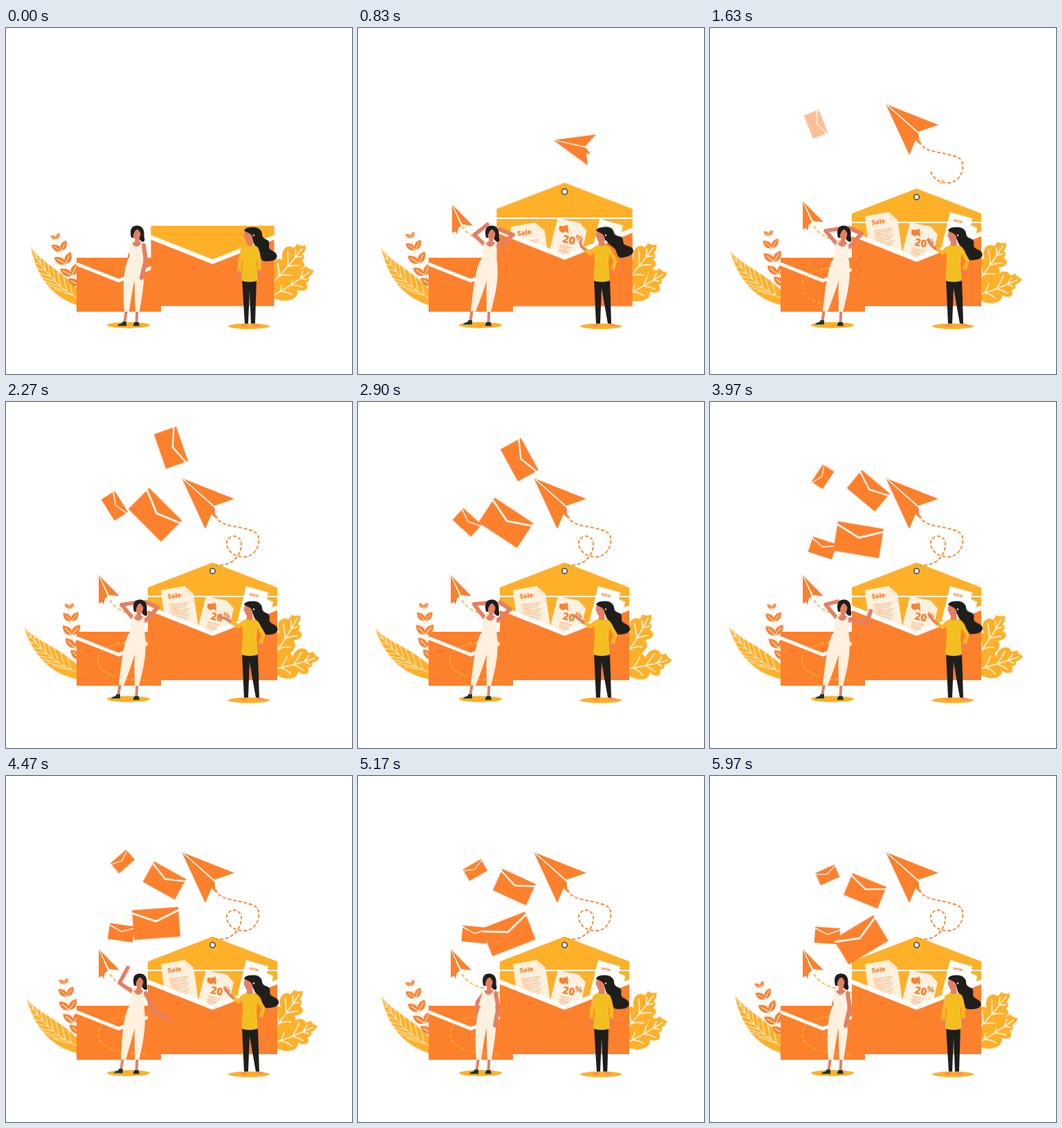
Recreate the animation shown at these times as an HTML page. Size 500 by 500 pixels, loop 6 s.

```html
<!DOCTYPE html>
<html lang="en">
<head>
<meta charset="utf-8">
<title>Mail campaign</title>
<style>
html, body { margin: 0; width: 100%; height: 100%; overflow: hidden; background: #fff; }
svg { display: block; width: 100vw; height: 100vh; }
text { font-family: "Open Sans", "Noto Sans", sans-serif; font-weight: 800; fill: #fd802d; }
.o { fill: #fd802d; }
.y { fill: #ffb029; }
.c { fill: #fff1e0; }
.k { fill: #1e1e1c; }
.s { fill: #e57f62; }
.teal { fill: #12363c; }
.w { fill: none; stroke: #fff; }
.limb { fill: none; stroke-linecap: round; stroke-linejoin: round; }
.skin { stroke: #e57f62; }
.sleeve { stroke: #fdb827; }
.anim { animation: 6s linear infinite; }
.pose { animation: 6s ease-in-out infinite; }

.sway { animation: sway 6s cubic-bezier(.37,0,.63,1) infinite; }
@keyframes sway { 0%, 100% { transform: rotate(0deg); } 50% { transform: rotate(var(--a)); } }

/* big envelope */
#big { transform-origin: 298.5px 402px; animation-name: pulse; }
@keyframes pulse {
  0%, 2% { transform: scale(.952); }
  12%, 14% { transform: scale(1.05); }
  19%, 53% { transform: scale(1); }
  57%, 59% { transform: scale(1.05); }
  64%, 100% { transform: scale(1); }
}
#flap { transform-origin: 298px 281px; animation-name: open; }
@keyframes open { 0%, 2% { transform: scaleY(-1); } 9%, 100% { transform: scaleY(1); } }
#edge { animation-name: edge; }
@keyframes edge { 0%, 2% { opacity: 0; } 4%, 100% { opacity: 1; } }
.letter { animation-name: rise; }
@keyframes rise {
  0%, 5% { transform: translateY(58px); }
  13.8% { transform: translateY(var(--mid)); }
  20%, 53% { transform: translateY(0); }
  57%, 59% { transform: translateY(var(--hop)); }
  64%, 100% { transform: translateY(0); }
}

/* paper planes */
#plane { animation-name: plane; }
@keyframes plane {
  0%, 6% { transform: translate(312px,262px) rotate(-70deg) scale(.1); opacity: 0; }
  7% { transform: translate(309px,235px) rotate(-62deg) scale(.3); opacity: 1; }
  10.5% { transform: translate(298px,178px) rotate(-45deg) scale(.62); }
  13.83% { transform: translate(282px,162px) rotate(-29deg) scale(.765); }
  21.2% { transform: translate(260px,122px) rotate(-7deg) scale(.95); }
  26%, 100% { transform: translate(254px,110px) rotate(0deg) scale(1); opacity: 1; }
}
#dart { animation-name: dart; }
@keyframes dart {
  0%, 5% { transform: translate(190px,340px) rotate(-20deg) scale(.2); opacity: 0; }
  6% { transform: translate(180px,325px) rotate(-20deg) scale(.4); opacity: 1; }
  13.83% { transform: translate(136px,255px) rotate(0deg) scale(1); }
  20%, 100% { transform: translate(134px,250px) rotate(0deg) scale(1); opacity: 1; }
}
.reveal { stroke-dasharray: 100; animation-name: reveal1; }
.reveal.b { animation-name: reveal2; }
@keyframes reveal1 { 0%, 18.3% { stroke-dashoffset: 100; } 32.5%, 100% { stroke-dashoffset: 0; } }
@keyframes reveal2 { 0%, 11.7% { stroke-dashoffset: 100; } 30%, 100% { stroke-dashoffset: 0; } }

/* falling mail */
#m1 { animation-name: m1; }
@keyframes m1 {
  0%, 25.4% { transform: translate(152px,137px) rotate(70deg) scale(.54); opacity: 0; }
  27.17% { transform: translate(153px,139px) rotate(68deg) scale(.54); opacity: .5; }
  29% { opacity: 1; }
  37.83% { transform: translate(157px,150px) rotate(58deg) scale(.54); }
  57.83% { transform: translate(158.5px,195.5px) rotate(28deg) scale(.54); }
  74.5% { transform: translate(166.5px,226.5px) rotate(8deg) scale(.54); animation-timing-function: ease-out; }
  100% { transform: translate(169.5px,230.5px) rotate(4deg) scale(.54); opacity: 1; }
}
#m2 { animation-name: m2; }
@keyframes m2 {
  0%, 32.5% { transform: translate(216px,155px) rotate(51deg); opacity: 0; }
  36% { opacity: 1; }
  37.83% { transform: translate(215.5px,163px) rotate(45deg); }
  57.83% { transform: translate(212px,185px) rotate(23deg); }
  74.5% { transform: translate(217px,213px) rotate(-4deg); animation-timing-function: ease-out; }
  100% { transform: translate(218px,237px) rotate(-31deg); opacity: 1; }
}
#m3 { animation-name: m3; }
@keyframes m3 {
  0%, 33% { transform: translate(239px,65px) rotate(74deg) scale(.79); opacity: 0; }
  36.5% { opacity: 1; }
  37.83% { transform: translate(238.5px,66px) rotate(71deg) scale(.79); }
  43% { transform: translate(236px,71px) rotate(67deg) scale(.79); }
  57.83% { transform: translate(228.5px,105.5px) rotate(51deg) scale(.79); }
  74.5% { transform: translate(229px,151px) rotate(29deg) scale(.79); animation-timing-function: ease-out; }
  100% { transform: translate(224px,166px) rotate(22deg) scale(.79); opacity: 1; }
}
#m4 { animation-name: m4; }
@keyframes m4 {
  0%, 51% { transform: translate(154px,80px) rotate(-84deg) scale(.45); opacity: 0; }
  54.5% { opacity: 1; }
  57.83% { transform: translate(157.3px,92.3px) rotate(-72deg) scale(.45); }
  74.5% { transform: translate(168.5px,123.5px) rotate(-41deg) scale(.45); animation-timing-function: ease-out; }
  100% { transform: translate(169.7px,143px) rotate(-24deg) scale(.45); opacity: 1; }
}

/* woman in white */
#aL { animation-name: aL; }
@keyframes aL {
  0%, 2%, 90%, 100% { d: path("M182 314L178 334L180 352"); }
  7% { d: path("M182 314L165 322L160 306"); }
  13.8% { d: path("M183 313L168 299L187 284"); }
  19%, 40% { d: path("M183 312L167 293L187 290"); }
  57.8%, 63% { d: path("M183 312L168 291L187 291"); }
  73%, 77% { d: path("M183 312L164 299L176 277"); }
  83% { d: path("M182 314L168 322L165 340"); }
}
#aR { animation-name: aR; }
@keyframes aR {
  0%, 2%, 88%, 100% { d: path("M199 314L202 335L196 361"); }
  7% { d: path("M201 314L219 320L224 303"); }
  13.8% { d: path("M204 315L224 299L205 291"); }
  19%, 46% { d: path("M204 314L219 297L202 289"); }
  56%, 64% { d: path("M203 314L228 318L232 295"); }
  73%, 77% { d: path("M202 314L214 339L234 351"); }
}
#suit { animation-name: suit; }
@keyframes suit {
  0%, 2%, 85%, 100% { d: path("M178 331C170 345 168 375 171 410L178 410C181 390 183 375 186 365C186 380 186 395 187 410L193 410C197 385 202 360 198 331Z"); }
  11%, 66% { d: path("M180 331C170 343 167 375 163 409L170 410C177 392 182 378 186 365C185 380 186 395 186 410L192 410C199 385 205 357 200 331Z"); }
}
.lean { animation-name: lean; }
@keyframes lean { 0%, 2%, 88%, 100% { transform: translate(0,0); } 12%, 75% { transform: translate(var(--x),0); } }
#foot { animation-name: foot; }
@keyframes foot { 0%, 2%, 85%, 100% { transform: translate(0,0); } 11%, 66% { transform: translate(-9px,-2px); } }

/* woman in yellow */
#lock { transform-origin: 356px 298px; animation-name: lock; }
@keyframes lock {
  0%, 2%, 100% { transform: rotate(0deg); }
  13.8% { transform: rotate(-13deg); }
  27.2% { transform: rotate(-4deg); }
  37.8% { transform: rotate(-2deg); }
  57.8% { transform: rotate(-4deg); }
  74.5% { transform: rotate(-5deg); }
  90% { transform: rotate(0deg); }
}
#sL { animation-name: sL; }
@keyframes sL {
  0%, 2%, 88%, 100% { d: path("M342 319L338 338L337 352"); }
  13.8%, 76% { d: path("M342 319L336 326L328 320"); }
  37.8% { d: path("M342 319L336 324L324 317"); }
}
#hL { animation-name: hL; }
@keyframes hL {
  0%, 2%, 88%, 100% { d: path("M337 353L338 357L337 361"); }
  13.8% { d: path("M328 320L323 316L321 309"); }
  27.2% { d: path("M326 319L320 314L315 306"); }
  37.8% { d: path("M324 317L317 313L308 310"); }
  57.8%, 76% { d: path("M328 320L322 315L317 308"); }
}
#sR { animation-name: sR; }
@keyframes sR {
  0%, 2%, 88%, 100% { d: path("M362 319L366 335L366 350"); }
  12%, 76% { d: path("M362 319L372 336L368 349"); }
}
#hR { animation-name: hR; }
@keyframes hR {
  0%, 2%, 88%, 100% { d: path("M366 351L366 358"); }
  12%, 76% { d: path("M368 350L363 355"); }
}
#legs { animation-name: legs; }
@keyframes legs {
  0%, 2%, 88%, 100% { d: path("M341 362L345 427L350 427L352 378L354 427L360 427L362 362Z"); }
  12%, 76% { d: path("M341 362L344 427L350 427L352 376L361 427L366 427L364 362Z"); }
}
#step { animation-name: step; }
@keyframes step { 0%, 2%, 88%, 100% { transform: translate(0,0); } 12%, 76% { transform: translate(6px,-1px); } }
</style>
</head>
<body>
<svg viewBox="0 0 500 500">
  <defs>
    <g id="mail">
      <rect class="o" x="-33.5" y="-21.5" width="67" height="43"/>
      <path class="w" stroke-width="2.6" d="M-33.5 -17L0 -3L33.5 -17"/>
    </g>
    <path id="trail1" pathLength="100" d="M303 164C309 181 334 178 352 185C366 188 367 198 364 208C358 224 345 226 333 222C322 218 316 206 320 199C325 192 337 191 340 203C341 222 327 237 304 236"/>
    <path id="trail2" pathLength="100" d="M150 286C158 298 168 304 184 307C212 312 226 326 206 347C165 344 134 352 133 372C133 394 165 403 208 402"/>
    <mask id="mask1" maskUnits="userSpaceOnUse" x="0" y="0" width="500" height="500">
      <use href="#trail1" class="reveal anim" fill="none" stroke="#fff" stroke-width="6"/>
    </mask>
    <mask id="mask2" maskUnits="userSpaceOnUse" x="0" y="0" width="500" height="500">
      <use href="#trail2" class="reveal b anim" fill="none" stroke="#fff" stroke-width="6"/>
    </mask>
    <path id="blade" d="M36 316C49 338 84 352 107 382L108 402C70 392 44 362 36 316Z"/>
    <clipPath id="bladeClip"><use href="#blade"/></clipPath>
    <g id="oak">
      <path class="y" d="M0 4C-9 0 -22 -12 -18 -24Q-15 -30 -10 -30Q-20 -37 -18 -46Q-15 -53 -10 -52Q-8 -57 -10 -60Q-4 -60 1 -66Q6 -61 5 -54Q12 -54 10 -47Q19 -47 18 -41Q17 -35 12 -32Q19 -29 19 -22C19 -10 10 0 0 4Z"/>
      <path class="w" stroke-width="1.4" d="M0 2Q2 -30 0 -60M-13 -23Q-4 -16 .5 -10Q5 -18 14 -22M-13 -44Q-5 -36 1 -28Q6 -35 13 -40M-6 -53L.5 -44L7 -51"/>
    </g>
  </defs>

  <!-- plants -->
  <g class="sway" style="--a:-8.3deg;transform-origin:102px 400px">
    <use href="#blade" class="y"/>
    <path id="veins" class="w" stroke-width=".9" clip-path="url(#bladeClip)"/>
  </g>
  <g id="sprig" class="sway" style="--a:17deg;transform-origin:108px 375px"></g>
  <g class="sway" style="--a:21deg;transform-origin:387px 386px">
    <use href="#oak" transform="translate(387 386) rotate(57) scale(1.03)"/>
  </g>
  <g class="sway" style="--a:-10deg;transform-origin:387px 366px">
    <use href="#oak" transform="translate(387 366) rotate(41) scale(1.05)"/>
  </g>

  <!-- small envelope -->
  <rect class="o" x="102" y="332" width="122" height="78"/>
  <path class="w" stroke-width="5" d="M102 341L163 365L224 341"/>
  <g mask="url(#mask2)"><use href="#trail2" fill="none" stroke="#ffb029" stroke-width="1.6" stroke-dasharray="1.9 1.2"/></g>

  <!-- big envelope -->
  <g id="big" class="pose">
    <g id="flap" class="pose">
      <path class="y" d="M205 281V268L298.5 232L392 268V281Z"/>
      <circle cx="298.5" cy="244.3" r="3.8" fill="#fff" stroke="#4b4640" stroke-width="1.6"/>
    </g>
    <path class="y" d="M205 280H392V298L298.5 336L205 298Z"/>
    <path id="edge" class="w anim" stroke-width="2" d="M205 281H392"/>
    <g class="letter anim" style="--mid:21px;--hop:-4px">
      <path class="c" d="M224 272L258 266L271 277L279 332L232 337Z"/>
      <path d="M258 266L260 278L271 277Z" fill="#ffe9d0"/>
      <text transform="translate(234 284.5) rotate(-8)" font-size="9.2">Sale</text>
      <path id="lines1" stroke="#fd802d" stroke-width=".8" opacity=".75"/>
    </g>
    <g class="letter anim" style="--mid:16px;--hop:-3px">
      <path fill="#fff" d="M347 266L379 275L377 285L386 289L380 325L335 315Z"/>
      <text transform="translate(351.5 279.5) rotate(12)" font-size="5">NOW</text>
    </g>
    <g class="letter anim" style="--mid:0px;--hop:-6px">
      <path class="c" d="M289 281L319 287L329 298L319 342L275 335Z"/>
      <path class="o" d="M291 294Q291 290 296 292L303 290L304 302L300 299L296 301L291 298Z"/>
      <text transform="translate(295 314) rotate(12)" font-size="15">20</text>
      <text transform="translate(313 311) rotate(12)" font-size="11">%</text>
      <path id="lines2" stroke="#fd802d" stroke-width=".8" opacity=".75"/>
    </g>
    <path fill="#fff" d="M205 294L298.5 331L392 294V303L298.5 340L205 303Z"/>
    <path class="o" d="M205 301L298.5 338L392 301V402H205Z"/>
  </g>

  <!-- woman in white -->
  <ellipse class="y" cx="177" cy="429.3" rx="31" ry="4.4"/>
  <g>
    <path id="aL" class="limb skin pose" stroke-width="5.5" d="M182 314L178 334L180 352"/>
    <g id="foot" class="pose">
      <path class="limb skin" stroke-width="4" d="M174 408L171.5 425"/>
      <path class="teal" d="M169 424L174 424.5V430.5H161Q162 427.5 167 427Z"/>
    </g>
    <path class="limb skin" stroke-width="4" d="M189.5 408L188.5 425"/>
    <path class="teal" d="M186 425H191.5L193 430.5H183.5Q184 427 186 425Z"/>
    <path id="suit" class="c pose" d="M178 331C170 345 168 375 171 410L178 410C181 390 183 375 186 365C186 380 186 395 187 410L193 410C197 385 202 360 198 331Z"/>
    <g class="lean pose" style="--x:2.5px">
      <path class="s" d="M180 318Q178 311 186 309L187 303H192L193 309Q203 311 201 319Z"/>
      <path class="c" d="M180 310L182 310Q184 316 189 316Q194 315 196 309L198 310Q197 316 198 322L197.500 333H178Q180 326 176 324Q179 317 180 310Z"/>
    </g>
    <path id="aR" class="limb skin pose" stroke-width="6" d="M199 314L202 335L196 361"/>
    <g class="lean pose" style="--x:4px">
      <path class="k" d="M181 303C178 291 182 285 190 285.5C198 286 200 293 199.5 299C199 303 202 306 199 309C196 309 193 307 192 303Z"/>
      <path class="s" d="M183.5 296Q185 291 189 290Q194 292 194.5 297Q194 303 191 306Q188 307 185 304Q183 301 183.5 296Z"/>
      <path class="k" d="M181 299Q182 290 191 287L195 291Q193 294 193 297Q193 292 190 291Q185 292 183.5 302Z"/>
    </g>
  </g>

  <!-- woman in yellow -->
  <ellipse class="y" cx="351" cy="431" rx="30" ry="4"/>
  <g>
    <g id="lock" class="pose">
      <path class="k" d="M350 289C358 286 369 289 370 297C370 302 372 304 377 306C384 310 377 316 382 320C387 324 392 324 391.5 331C389 338 379 337 374 337C365 336 369 328 366 322C363 316 357 314 357 306Z"/>
    </g>
    <path id="sR" class="limb sleeve pose" stroke-width="5.5" d="M362 319L366 335L366 350"/>
    <path id="hR" class="limb skin pose" stroke-width="4" d="M366 351L366 358"/>
    <path class="limb" stroke="#ff8c52" stroke-width="3.5" d="M347 427L346.5 429.5L341.5 430"/>
    <path id="step" class="limb pose" stroke="#ff8c52" stroke-width="3.5" d="M357 427L358 429.5L364 430.5"/>
    <path id="legs" class="k pose" d="M341 362L345 427L350 427L352 378L354 427L360 427L362 362Z"/>
    <path class="s" d="M349 305H356L357 315L352 318L347 315Z"/>
    <path d="M341 317Q344 314 348 313.5Q352 317 357 313.5Q362 314 364 318L362 340L364 365Q352 369 340 365L342 340Z" fill="#f3bf20"/>
    <path id="sL" class="limb sleeve pose" stroke-width="5.5" d="M342 319L338 338L337 352"/>
    <path id="hL" class="limb skin pose" stroke-width="3.8" d="M337 353L338 357L337 361"/>
    <path class="s" d="M345 293Q350 290 356 294L357 303Q355 309 350 309.5Q346 309 345.5 304L343.5 301Z"/>
    <path class="k" d="M344 293Q346 287.5 355 288.5Q365 290 364 300Q362 309 357 307Q356 299 352 297Q348 295 344 293Z"/>
    <circle cx="358" cy="299.5" r="1.3" fill="#ffd08a"/>
  </g>

  <!-- planes and mail -->
  <g mask="url(#mask1)"><use href="#trail1" fill="none" stroke="#fd802d" stroke-width="1.8" stroke-dasharray="2.1 1.2"/></g>
  <g id="plane" class="anim">
    <path class="o" d="M0 0L76 30L47 40Z"/>
    <path class="o" d="M0 0L47.5 43L49 58L43 52L34 73.5Z"/>
    <path class="w" stroke-width="1.4" d="M2 1.5L47.5 41.5"/>
  </g>
  <g id="dart" class="anim">
    <path class="o" d="M0 0L30 30.5L15 29Z"/>
    <path class="o" d="M0 0L13 31L9 34L7 43L5 39L0 41Z"/>
    <path class="w" stroke-width="1" d="M1 2L13.5 29.5"/>
  </g>
  <use id="m1" class="anim" href="#mail"/>
  <use id="m3" class="anim" href="#mail"/>
  <use id="m2" class="anim" href="#mail"/>
  <use id="m4" class="anim" href="#mail"/>
</svg>
<script>
const $ = id => document.getElementById(id);
const range = (n, f) => Array.from({ length: n }, (_, i) => f(i));

// Blade veins: a curved midrib with ribs on both sides.
const bez = (t, a, b, c) => (1 - t) ** 2 * a + 2 * t * (1 - t) * b + t * t * c;
$('veins').setAttribute('d', 'M36 316Q60 368 108 393' + range(8, i => {
  const t = .17 + i * .1, x = bez(t, 36, 60, 108), y = bez(t, 316, 368, 393);
  return `M${x} ${y}q-2 -12 -5 -28M${x} ${y}q-12 -3 -26 -9`;
}).join(''));

// Sprig: leaf pairs along a curved stem.
const leaf = (x, y, turn, size) => `<g transform="translate(${x} ${y}) rotate(${turn}) scale(${size})">
  <path class="o" d="M0 0C-7 -5 -6 -13 0 -19C6 -13 7 -5 0 0Z"/>
  <path class="w" stroke-width=".9" d="M0 0V-14"/></g>`;
const nodes = [[73, 305, .52], [80, 322, .88], [86, 341, 1], [95, 358, 1.04], [106, 372, 1]];
$('sprig').innerHTML = '<path fill="none" stroke="#ffd9bd" stroke-width="1" d="M73 304Q82 345 108 375"/>' +
  nodes.map(([x, y, s]) => leaf(x, y, -60, s) + leaf(x, y, 24, s)).join('');

// Fine print on the letters.
const print = (id, n, x, y, dx, dy, w, h) => $(id).setAttribute('d',
  range(n, i => `M${x + i * dx} ${y + i * dy}l${w - i % 3 * 2} ${h}`).join(''));
print('lines1', 9, 236, 293.5, .45, 3, 27, -4);
print('lines2', 5, 292, 318, -.6, 2.4, 17, 4);
</script>
</body>
</html>
```
